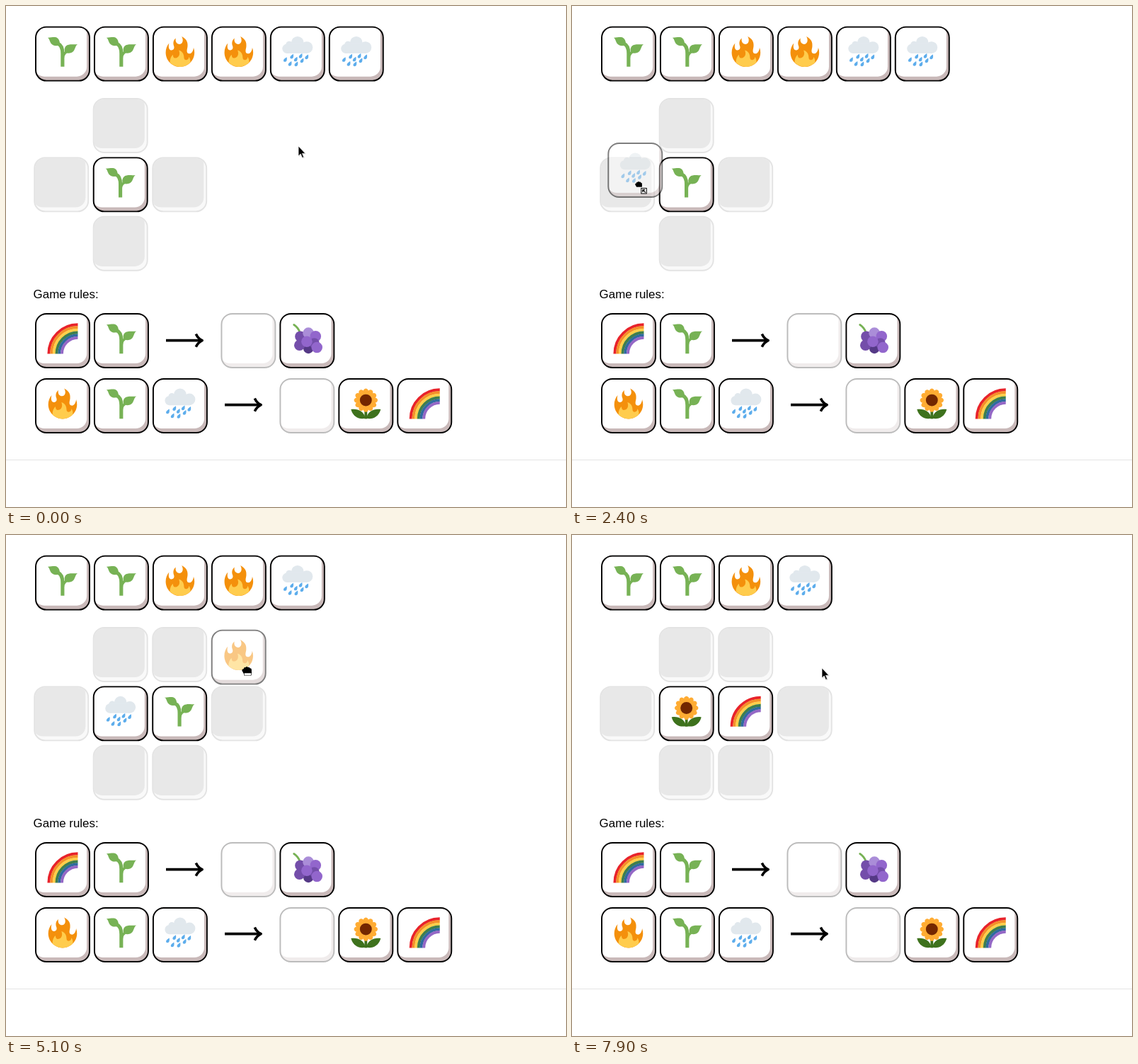
Write an HTML page that moves like this. It is 791x708 px and loops after 8000 ms.

```html
<!DOCTYPE html>
<html lang="en">
<head>
<meta charset="utf-8">
<title>Tile game</title>
<style>
  html, body { margin: 0; width: 100%; height: 100%; overflow: hidden; background: #fff; }
  svg { display: block; }
  text { font: 16.9px "Liberation Sans", Arial, sans-serif; }
  .blank { opacity: .26; }
  .ghost { opacity: .5; }
</style>
</head>
<body>
<svg id="stage" width="791" height="708" viewBox="0 0 791 708">
  <defs><clipPath id="face"><rect x="1.9" y="1.9" width="74.2" height="74.2" rx="14"/></clipPath></defs>
  <text x="38.6" y="413">Game rules:</text>
  <rect y="641" width="791" height="1" fill="#e4e4e4"/>
</svg>
<script>
const stage = document.getElementById('stage');
const range = n => [...Array(n).keys()];
const circle = (x, y, r, fill = '') => `<circle cx="${x}" cy="${y}" r="${r}"${fill && ` fill="${fill}"`}/>`;
const path = (d, attrs = '') => `<path d="${d}" ${attrs}/>`;
const line = (d, color, width, cap = 'butt') =>
  path(d, `fill="none" stroke="${color}" stroke-width="${width}" stroke-linecap="${cap}" stroke-linejoin="round"`);

// Icons, drawn in a 36 unit box
const drop = ([x, y]) => path(
  `M${x + 2} ${y - 3}C${x + 2.6} ${y} ${x + 2.1} ${y + 2.6} ${x - .2} ${y + 2.6}C${x - 2.7} ${y + 2.4} ${x - 2.5} ${y - .5} ${x + 2} ${y - 3}Z`,
  'fill="#5dadec"');

const arcs = ['#e8232b', '#f4902a', '#ffcf4a', '#3f7f4d', '#2f6b9f', '#9468c6'].map((c, i) => {
  const r = 34.4 - i * 3.1;
  return line(`M${36 - r} 36A${r} ${r} 0 0 1 36 ${36 - r}`, c, 3.3);
}).join('');

const petals = range(12).map(i =>
  `<ellipse cx="18" cy="4.4" rx="3.3" ry="4.4" transform="rotate(${i * 30} 18 14)"/>`).join('');

const leaf = 'M17.6 35.3C11 37 3 34.6 .4 24.8C8 23.6 15.5 26.5 17.6 35.3Z';

const icons = {
  sprout:
    path('M.4 1.5C4.4 1.8 9 -.4 12.2 2.2C14.7 4.4 14.9 8 14.4 10.2C10.6 11.8 6 11.2 4 8C2.5 5.4 2.6 3 .4 1.5Z', 'fill="#77b255"') +
    path('M35.6 9.3C31 10 25 8.4 22 11.4C19.8 13.8 20 17.2 20.8 19C24 20.6 28.6 20.3 31.1 17.2C33 14.6 33 11.4 35.6 9.3Z', 'fill="#77b255"') +
    line('M12.4 8.4C16.6 10.2 17.9 15 17.9 20V35.8', '#77b255', 4.3) +
    line('M18.4 25C18.6 21 21 18.6 25 16.6', '#77b255', 3),
  fire:
    path('M35 19c0-2.062-.367-4.039-1.04-5.868-.46 5.389-3.333 8.157-6.335 6.868-2.812-1.208-.917-5.917-.777-8.164.236-3.809-.012-8.169-6.931-11.794 2.875 5.5.333 8.917-2.333 9.125-2.958.231-5.667-2.542-4.667-7.042-3.238 2.386-3.332 6.402-2.333 9 1.042 2.708-.042 4.958-2.583 5.208-2.84.28-4.418-3.041-2.963-8.333C2.52 10.965 1 14.805 1 19c0 9.389 7.611 17 17 17s17-7.611 17-17z', 'fill="#f4900c"') +
    path('M28.394 24c.148 3.084-2.561 4.293-4.019 3.709-2.106-.843-1.541-2.291-2.083-5.291s-2.625-5.083-5.708-6c2.25 6.333-1.247 8.667-3.08 9.084-1.872.426-3.753 0-3.968-4.007C7.352 23.668 6 26.676 6 30c0 .368.023.73.055 1.09C9.125 34.124 13.342 36 18 36s8.875-1.876 11.945-4.91C30.6 28.5 29.8 26 28.394 24z', 'fill="#ffcc4d"'),
  rain:
    `<g fill="#e1e8ed">${circle(5.6, 14.4, 5.6)}${circle(8.2, 9.6, 4)}${circle(18, 7.4, 7.4)}${circle(29, 13, 7)}<rect x="5.6" y="9" width="23.4" height="11"/></g>` +
    [[11, 23.8], [21.4, 23.2], [28.6, 24.4], [15.6, 27], [3.2, 27.4], [8.8, 32.4], [16.2, 32.8], [23, 28.6]].map(drop).join(''),
  rainbow: arcs,
  grapes:
    line('M2.4 1.8C6 4 8 7 9.6 11', '#77b255', 2.4, 'round') +
    circle(19.5, 29.8, 6, '#553986') + circle(10, 15.6, 6.4, '#744eaa') + circle(19.5, 11.6, 6.6, '#aa8dd8') +
    circle(28, 15.4, 6.5, '#9266cc') + circle(9, 26, 6.4, '#744eaa') + circle(26.4, 23.4, 6, '#744eaa') +
    circle(17.6, 21.6, 6.5, '#9266cc') + circle(29.6, 28.6, 6.5, '#9266cc'),
  sunflower:
    `<g fill="#3e721d"><rect x="16.4" y="25" width="3.2" height="11"/>${path(leaf)}${path(leaf, 'transform="matrix(-1 0 0 1 36 0)"')}</g>` +
    `<g fill="#ffac33">${petals}${circle(18, 14, 10)}</g>` + circle(18, 14, 7.1, '#732700')
};

function group(parent, html = '', cls = '') {
  const g = document.createElementNS('http://www.w3.org/2000/svg', 'g');
  g.setAttribute('class', cls);
  g.innerHTML = html;
  parent.append(g);
  return g;
}
const place = (el, x, y) => el.setAttribute('transform', `translate(${x} ${y})`);

// A rounded face, its lower right edge and an outline
const SIZE = 78;
const square = (border, edge, face) =>
  `<rect x="1" y="1" width="76" height="76" rx="15" fill="${edge}"/>` +
  `<g clip-path="url(#face)"><rect x="-1.1" y="-3.1" width="74.2" height="74.2" rx="14" fill="${face}"/></g>` +
  `<rect x="1" y="1" width="76" height="76" rx="15" fill="none" stroke="${border}" stroke-width="1.9"/>`;
const plain = square('#000', '#c9b9b9', '#fff');
const hollow = square('#e3e3e3', '#f9f9f9', '#e8e8e8');

function tile(parent, name, x, y, cls) {
  const mark = name ? `<g transform="translate(17.5 14.4) scale(1.194)">${icons[name]}</g>` : '';
  const el = group(parent, plain + mark, cls);
  place(el, x, y);
  return el;
}

// Layout
const trayX = i => 41 + 82.95 * i;
const rightX = i => 303.4 + 82.95 * i;
const cellX = c => 39.2 + 83.5 * c;
const cellY = r => 130 + 83.4 * r;

const arrow = (x, y) => place(group(stage,
  line('M0 0H51', '#000', 3.8) + line('M42.3 -9.2Q45.3 -2.6 51.2 0Q45.3 2.6 42.3 9.2', '#000', 3.6)), x, y);
arrow(226, 472.6);
arrow(309, 563.6);

['rainbow', 'sprout'].forEach((n, i) => tile(stage, n, trayX(i), 434));
['fire', 'sprout', 'rain'].forEach((n, i) => tile(stage, n, trayX(i), 526));
tile(stage, '', rightX(0), 434, 'blank');
tile(stage, 'grapes', rightX(1), 434);
tile(stage, '', rightX(1), 526, 'blank');
tile(stage, 'sunflower', rightX(2), 526);
tile(stage, 'rainbow', rightX(3), 526);

// Board states: the time each begins, tray icons and middle-row icons
const states = [
  [0, 'sprout sprout fire fire rain rain', 'sprout'],
  [3000, 'sprout sprout fire fire rain', 'rain sprout'],
  [6300, 'sprout sprout fire rain', 'sunflower rainbow']
].map(([start, tray, row]) => {
  const layer = group(stage);
  const tiles = [], slots = [];
  const put = (name, x, y) => {
    tile(layer, name, x, y);
    tiles.push([x, y]);
  };
  const free = (c, r) => {
    place(group(layer, hollow), cellX(c), cellY(r));
    slots.push([cellX(c), cellY(r)]);
  };
  const names = row.split(' ');
  tray.split(' ').forEach((n, i) => put(n, trayX(i), 28.6));
  free(0, 1);
  free(names.length + 1, 1);
  names.forEach((n, i) => {
    free(i + 1, 0);
    free(i + 1, 2);
    put(n, cellX(i + 1), cellY(1));
  });
  return { start, layer, tiles, slots };
});

// Drags: dragged tile position over time; the pointer runs one step ahead
const STEP = 100, LOOP = 8000;
const drags = [
  { name: 'rain', end: 3000, grip: [44, 60],
    keys: [[1500, 330, 55], [1800, 262, 95], [1900, 233, 101], [2100, 130, 158], [2300, 51, 191.5], [2400, 50.3, 193]] },
  { name: 'fire', end: 6300, grip: [55, 38],
    keys: [[4800, 290, 62], [5100, 289.7, 133.6], [5200, 285, 154], [5300, 277, 188], [5400, 273, 208]] }
];
for (const d of drags) d.el = tile(stage, d.name, 0, 0, 'ghost');

const moves = [
  [100, 413, 198], [200, 414, 194], [500, 426, 142], [700, 424, 106], [1000, 417, 89],
  [3600, 94, 254], [3700, 124, 234], [3900, 270, 132], [4100, 356, 64],
  [4200, 356, 64], [4500, 347, 66], [4600, 345, 66],
  [7600, 328, 247.5], [7700, 329, 243], [7900, 353, 188]
];
const rests = [[1000, 3000, 4], [3000, 3600, 5], [4600, 6300, 11], [6300, 7600, 12]];

function along(keys, t) {
  if (t <= keys[0][0]) return keys[0].slice(1);
  const i = keys.findIndex(k => k[0] >= t);
  if (i < 0) return keys[keys.length - 1].slice(1);
  const [a, b] = [keys[i - 1], keys[i]];
  const f = (t - a[0]) / (b[0] - a[0]);
  return [1, 2].map(j => a[j] + (b[j] - a[j]) * f);
}

// Pointer shapes, around their hot spot
const fist = 'M-7 0Q-7.6 -2.8 -4.8 -2.8Q-4.4 -5.6 -2.2 -4.8Q-.6 -7 1.2 -5Q3.4 -6 4.2 -3.6Q6.6 -4 6.4 -1V4.5H-4.4Z';
const shapes = {
  arrow: path('M1 1V15L4.2 12L6.4 17.4L8.8 16.4L6.6 11.2H11Z', 'fill="#000" opacity=".15"') +
    path('M0 0V14L3.2 11L5.4 16.4L7.6 15.4L5.4 10.4H9.8Z', 'fill="#000" stroke="#fff" stroke-width=".7"'),
  open: path('M5 15.8C4 12.4 1 9.8 .8 8.3C.8 6.8 2.6 6.8 3.8 8.6L2.6 3.7C2.4 2 4.2 1.8 4.7 3.3L6 6.8V1.8C6 .2 8 .2 8.1 1.8L8.5 6.6L9.6 2C10 .6 11.8 1 11.6 2.6L11 7L13 4C14 2.8 15.4 3.6 14.8 5C13 9 13.5 12 12 15.8Z',
    'transform="translate(-8 -8.3)" fill="#fff" stroke="#000" stroke-width="1.1" stroke-linejoin="round"'),
  closed: `<g transform="translate(.5 0)">${path(fist)}<rect x="-4" y="3" width="10" height="3.4" fill="#fff" stroke="#000" stroke-dasharray="1 1"/></g>`,
  link: path(fist, 'transform="translate(0 -.6) scale(.72)"') +
    '<rect x="3.5" y="4.5" width="7.5" height="7.5" fill="#fff" stroke="#000"/>' +
    line('M5.6 10V6.6H9M5.8 6.8L9.6 10.6', '#000', 1.2)
};
const pointer = group(stage);
for (const [name, html] of Object.entries(shapes)) group(pointer, html, name);

const inside = (list, [x, y]) => list.some(([l, t]) => x >= l && x < l + SIZE && y >= t && y < t + SIZE);
const show = (el, on) => { el.style.display = on ? '' : 'none'; };

function draw(time) {
  const t = Math.floor(time / STEP) * STEP;
  const state = states.filter(s => s.start <= t).pop();
  states.forEach(s => show(s.layer, s === state));

  const rest = rests.find(([from, to]) => t >= from && t < to);
  let pos = rest ? moves[rest[2]].slice(1) : along(moves, t);
  let dragging = false;
  for (const d of drags) {
    const on = t >= d.keys[0][0] && t < d.end;
    show(d.el, on);
    if (!on) continue;
    dragging = true;
    place(d.el, ...along(d.keys, t));
    pos = along(d.keys, t + STEP).map((v, i) => v + d.grip[i]);
  }

  let shape = inside(state.tiles, pos) ? 'open' : 'arrow';
  if (dragging) shape = inside(state.slots, pos) ? 'link' : 'closed';
  else if ((t >= 1200 && t < 1500) || (t >= 4600 && t < 4800)) shape = 'closed';
  else if (t >= 6300 && t < 7700) shape = 'open';
  for (const el of pointer.children) show(el, el.getAttribute('class') === shape);
  place(pointer, ...pos);
}

const begin = performance.now();
function frame() {
  draw((performance.now() - begin) % LOOP);
  requestAnimationFrame(frame);
}
frame();
</script>
</body>
</html>
```
